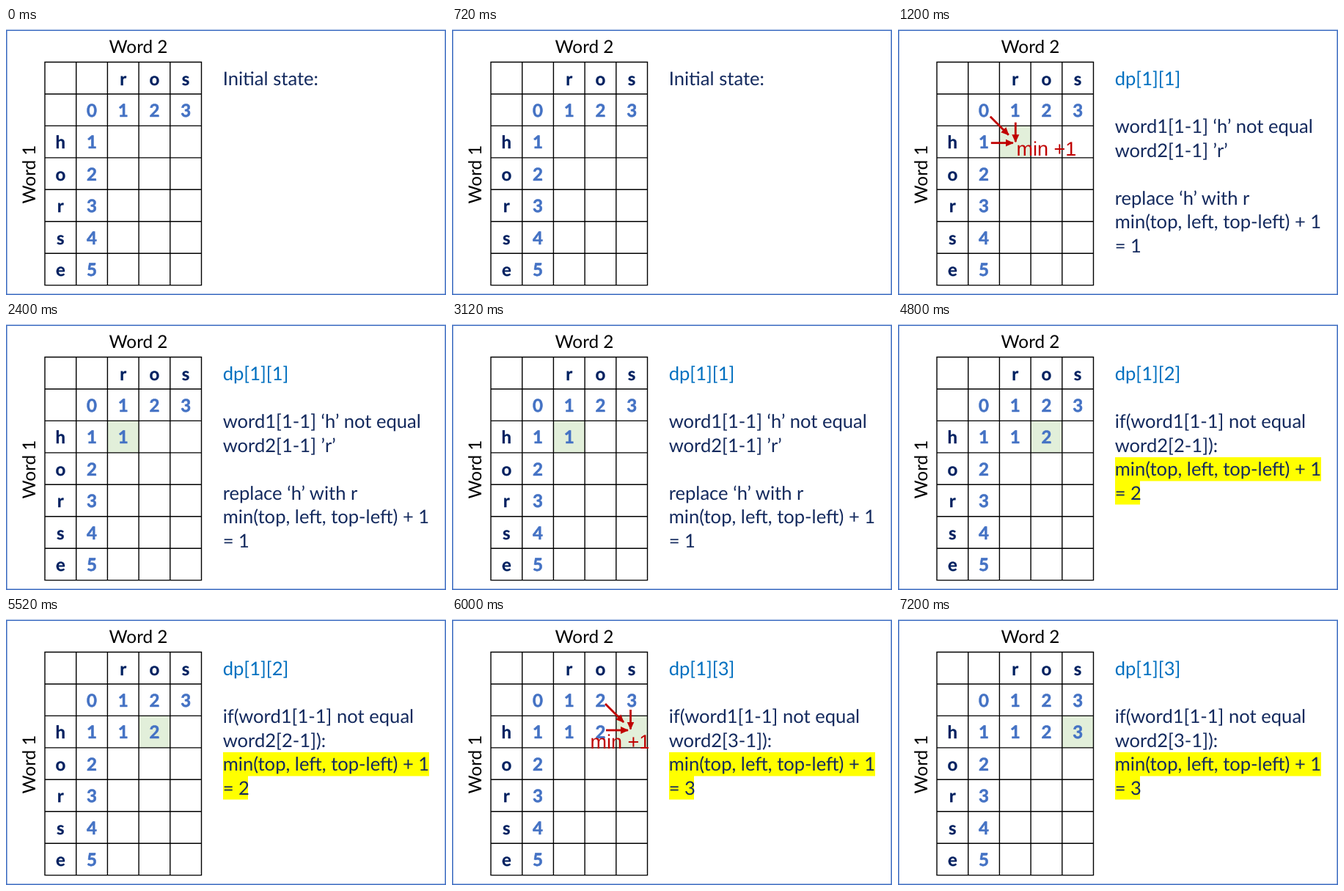
Animation of 600x364 px, one loop 8000 ms. Source, as an HTML page:

```html
<!DOCTYPE html>
<html lang="en">
<head>
<meta charset="utf-8">
<title>Edit distance table</title>
<style>
  html, body { margin: 0; width: 100%; height: 100%; overflow: hidden; background: #fff; }
  svg { display: block; width: 100vw; height: 100vh; }
  text { font-family: Lato, sans-serif; white-space: pre; text-rendering: geometricPrecision; }
  .title { font-size: 24.3px; text-anchor: middle; fill: #000; }
  .cell { font-size: 24px; font-weight: 700; text-anchor: middle; fill: #4472c4; stroke: #4472c4; stroke-width: 0.6; }
  .letter { fill: #002060; stroke: #002060; stroke-width: 0.3; }
  .note { font-size: 25.6px; fill: #142a5e; }
  .head { fill: #0070c0; }
  .min { font: 27px "Liberation Sans", Arial, sans-serif; fill: #c00000; }
  .arrow { stroke: #c00000; stroke-width: 2.8; marker-end: url(#tip); }
</style>
</head>
<body>
<svg id="stage" viewBox="0 0 600 364" preserveAspectRatio="none">
  <defs>
    <marker id="tip" markerUnits="userSpaceOnUse" markerWidth="11" markerHeight="11" refX="10" refY="5.5" orient="auto">
      <path d="M0 0.5L11 5.5L0 10.5Z" fill="#c00000"/>
    </marker>
    <clipPath id="edge"><rect width="268" height="364"/></clipPath>
  </defs>
</svg>
<script>
const NS = 'http://www.w3.org/2000/svg';
const STEP = 1200, LOOP = 8000;
const X0 = 53, Y0 = 46.5, CW = 42.7, CH = 43.45, COLS = 5, ROWS = 7;
const stage = document.getElementById('stage');

function add(parent, tag, attrs, text) {
  const el = document.createElementNS(NS, tag);
  for (const k in attrs) el.setAttribute(k, attrs[k]);
  if (text !== undefined) el.textContent = text;
  parent.append(el);
  return el;
}

const colX = c => X0 + CW * c;
const rowY = r => Y0 + CH * r;

function cellText(parent, c, r, s, cls = '') {
  add(parent, 'text', { x: colX(c + 0.5), y: rowY(r) + 31, class: 'cell ' + cls }, s);
}

function note(parent, y, s, cls = '') {
  add(parent, 'text', { x: 295.7, y, class: 'note ' + cls }, s);
}

function arrow(parent, x1, y1, x2, y2) {
  add(parent, 'line', { x1, y1, x2, y2, class: 'arrow' });
}

// Layers: highlights, table, changing notes and arrows
const under = add(stage, 'g', {});
const table = add(stage, 'g', {});
const over = add(stage, 'g', {});

add(table, 'rect', { x: 0.8, y: 3.2, width: 598.4, height: 360, fill: 'none', stroke: '#4472c4', 'stroke-width': 1.6 });
let grid = '';
for (let c = 0; c <= COLS; c++) grid += `M${colX(c)} ${Y0}V${rowY(ROWS)}`;
for (let r = 0; r <= ROWS; r++) grid += `M${X0} ${rowY(r)}H${colX(COLS)}`;
add(table, 'path', { d: grid, fill: 'none', stroke: '#000', 'stroke-width': 1.4, 'stroke-linecap': 'square' });
add(table, 'text', { x: 180.5, y: 34, class: 'title' }, 'Word 2');
add(table, 'text', { transform: 'translate(40.2 199.5) rotate(-90)', class: 'title' }, 'Word 1');
[...'ros'].forEach((s, i) => cellText(table, i + 2, 0, s, 'letter'));
[...'horse'].forEach((s, i) => cellText(table, 0, i + 2, s, 'letter'));
for (let i = 0; i < 4; i++) cellText(table, i + 1, 1, i);
for (let i = 1; i < 6; i++) cellText(table, 1, i + 1, i);

// Per column: arrow meeting point and label position
const moves = [
  { x: 160.3, y: 156.7, label: [161.5, 174.3] },
  { x: 200.5, y: 153.5, label: [201.5, 170.5] },
  { x: 243.5, y: 153, label: [188.5, 178] }
];

function drawArrows(g, { x, y, label }) {
  const [lx, ly] = label;
  arrow(g, x - 34.5, y - 36, x - 9.5, y - 11);
  arrow(g, x, y - 28, x, y - 1.5);
  arrow(g, x - 33.5, y, x - 3.5, y);
  const clip = add(g, 'g', { 'clip-path': 'url(#edge)' });
  add(clip, 'text', { x: lx, y: ly, class: 'min' }, 'min +1');
}

function drawNotes(g, back, j) {
  note(g, 78, `dp[1][${j}]`, 'head');
  if (j === 1) {
    ['word1[1-1] ‘h’ not equal', 'word2[1-1] ’r’', '', 'replace ‘h’ with r',
      'min(top, left, top-left) + 1', '= 1'].forEach((s, i) => note(g, 143 + 32.5 * i, s));
    return;
  }
  add(back, 'path', { d: 'M296 183H577V215.5H330V247.5H296Z', fill: '#ff0' });
  ['if(word1[1-1] not equal', `word2[${j}-1]):`, 'min(top, left, top-left) + 1', `= ${j}`]
    .forEach((s, i) => note(g, 143 + 32.5 * i, s));
}

function buildScene(n) {
  const back = add(under, 'g', {});
  const front = add(over, 'g', {});
  const j = Math.ceil(n / 2);
  const done = Math.floor(n / 2);
  if (n === 0) {
    note(front, 78, 'Initial state:');
  } else {
    add(back, 'rect', { x: colX(j + 1), y: rowY(2), width: CW, height: CH, fill: '#e2efda' });
    for (let i = 1; i <= done; i++) cellText(front, i + 1, 2, i);
    drawNotes(front, back, j);
    if (n % 2) drawArrows(front, moves[j - 1]);
  }
  return [back, front];
}

const scenes = Array.from({ length: 7 }, (_, n) => buildScene(n));
const start = performance.now();
let shown = -1;

function render(now) {
  const n = Math.floor((Math.max(0, now - start) % LOOP) / STEP);
  if (n !== shown) {
    scenes.forEach((parts, i) => parts.forEach(p => { p.style.display = i === n ? '' : 'none'; }));
    shown = n;
  }
  requestAnimationFrame(render);
}
render(start);
</script>
</body>
</html>
```
